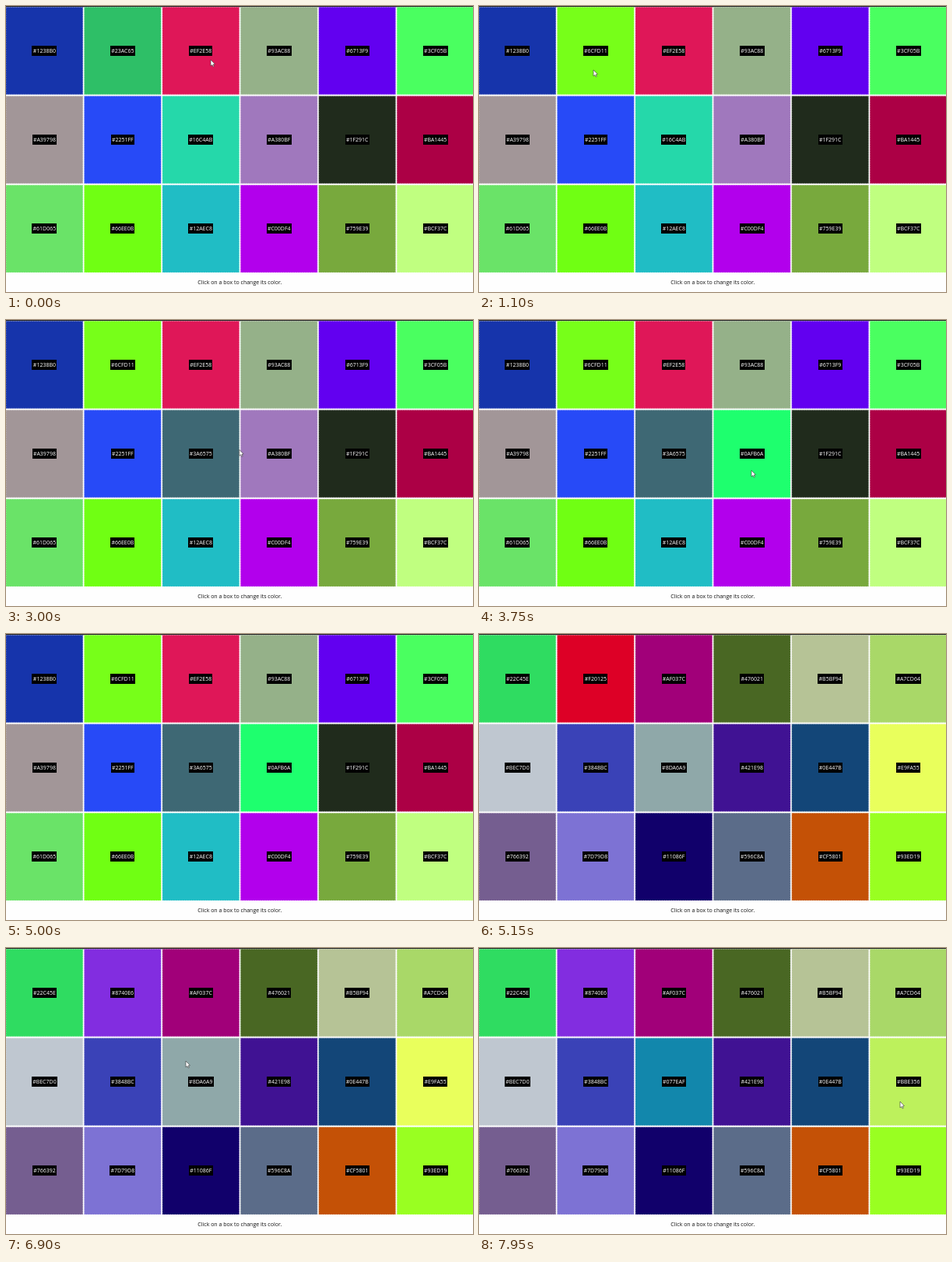
Animation of 600 by 367 pixels, one loop 8000 ms. Source, as an HTML page with a canvas:

```html
<!DOCTYPE html>
<html lang="en">
<head>
<meta charset="utf-8">
<title>Color boxes</title>
<style>
html, body { margin: 0; width: 100%; height: 100%; overflow: hidden; background: #fefefe; }
canvas { display: block; }
</style>
</head>
<body>
<canvas id="stage" width="600" height="367"></canvas>
<script>
const ctx = document.getElementById('stage').getContext('2d');
const LOOP = 8000;
const RELOAD = 5100;
const MOVE = 550;        // travel time of the pointer
const CLICK_DELAY = 100; // pause between arriving and clicking
const COLS = 6;
const CELL = { x: 0, y: 1.3, w: 98.8, h: 112.3, dx: 100.45, dy: 114.2 };

const palettes = [
  `1238B0 23AC65 EF2E58 93AC88 6713F9 3CF05B
   A39798 2251FF 16C4AB A380BF 1F291C BA1445
   61D065 66EE0B 12AEC8 C00DF4 759E39 BCF37C`,
  `22C45E F20125 AF037C 476021 B5BF94 A7CD64
   BEC7D0 3848BC 8DA6A9 421E98 0E447B E9FA55
   766392 7D79D8 11086F 596C8A CF5801 93ED19`
].map(list => list.trim().split(/\s+/));

// Where the pointer arrives, and the color its click gives the box below it.
const stops = [
  { at: 0, x: 263, y: 69 },
  { at: 850, x: 147, y: 82, color: '6CFD11' },
  { at: 2200, x: 233, y: 131, color: '3A6575' },
  { at: 3250, x: 350, y: 193, color: '0AFB6A' },
  { at: 4350, x: 14, y: -14 },
  { at: 6150, x: 147, y: 82, color: '8740E6' },
  { at: 6900, x: 231, y: 145, color: '077EAF' },
  { at: 7800, x: 541, y: 197, color: 'BBE356' }
];

const ease = p => p * p * (3 - 2 * p);

// Recorded video look: encoded as BT.709, decoded as BT.601.
function videoColor(hex) {
  const [r, g, b] = [0, 2, 4].map(i => parseInt(hex.slice(i, i + 2), 16));
  const luma = 0.2126 * r + 0.7152 * g + 0.0722 * b;
  const cb = (b - luma) / 1.8556;
  const cr = (r - luma) / 1.5748;
  const rgb = [luma + 1.402 * cr, luma - 0.344 * cb - 0.714 * cr, luma + 1.772 * cb];
  return `rgb(${rgb.map(v => Math.max(0, Math.min(255, Math.round(v))))})`;
}

function pointerAt(t) {
  let { x, y } = stops[0];
  for (const stop of stops.slice(1)) {
    const p = ease(Math.max(0, Math.min(1, (t - stop.at + MOVE) / MOVE)));
    x += (stop.x - x) * p;
    y += (stop.y - y) * p;
  }
  return [x, y];
}

function boxesAt(t) {
  const reloaded = t >= RELOAD;
  const boxes = palettes[Number(reloaded)].slice();
  for (const { at, x, y, color } of stops) {
    const sameRun = (at >= RELOAD) === reloaded;
    if (!color || !sameRun || t < at + CLICK_DELAY) continue;
    boxes[Math.floor(x / CELL.dx) + COLS * Math.floor(y / CELL.dy)] = color;
  }
  return boxes;
}

function drawBox(hex, i) {
  const { w, h } = CELL;
  const x = CELL.x + CELL.dx * (i % COLS);
  const y = CELL.y + CELL.dy * Math.floor(i / COLS);
  ctx.fillStyle = videoColor(hex);
  ctx.fillRect(x, y, w, h);

  ctx.strokeStyle = 'rgba(255,255,255,0.3)';
  ctx.lineWidth = 0.7;
  ctx.setLineDash([1.5, 1.5]);
  ctx.strokeRect(x + 0.35, y + 0.35, w - 0.7, h - 0.7);
  ctx.setLineDash([]);

  const text = '#' + hex;
  const cx = x + w / 2;
  const top = Math.round(y + h / 2 - 6.5);
  const width = Math.round(ctx.measureText(text).width + 2.5);
  ctx.fillStyle = '#000';
  ctx.fillRect(Math.round(cx - width / 2), top, width, 13);
  ctx.fillStyle = '#fff';
  ctx.fillText(text, cx, top + 9);
}

function drawPointer(x, y) {
  ctx.save();
  ctx.translate(x, y);
  ctx.beginPath();
  ctx.moveTo(0, 0);
  for (const [px, py] of [[0, 8], [1.9, 6.4], [3.1, 9], [4.3, 8.4], [3.2, 5.9], [5.4, 5.6]]) {
    ctx.lineTo(px, py);
  }
  ctx.closePath();
  ctx.fillStyle = '#fff';
  ctx.fill();
  ctx.strokeStyle = '#333';
  ctx.lineWidth = 0.6;
  ctx.stroke();
  ctx.restore();
}

function draw(t) {
  ctx.fillStyle = '#fefefe';
  ctx.fillRect(0, 0, 600, 367);
  ctx.fillStyle = '#242424';
  ctx.fillRect(0, 0, 600, CELL.y);
  ctx.font = '7px "Open Sans", "Noto Sans", sans-serif';
  ctx.textAlign = 'center';
  boxesAt(t).forEach(drawBox);
  ctx.fillStyle = '#111';
  ctx.fillText('Click on a box to change its color.', 300.5, 357);
  drawPointer(...pointerAt(t));
}

const start = performance.now();
function frame() {
  draw((performance.now() - start) % LOOP);
  requestAnimationFrame(frame);
}
frame();
</script>
</body>
</html>
```
